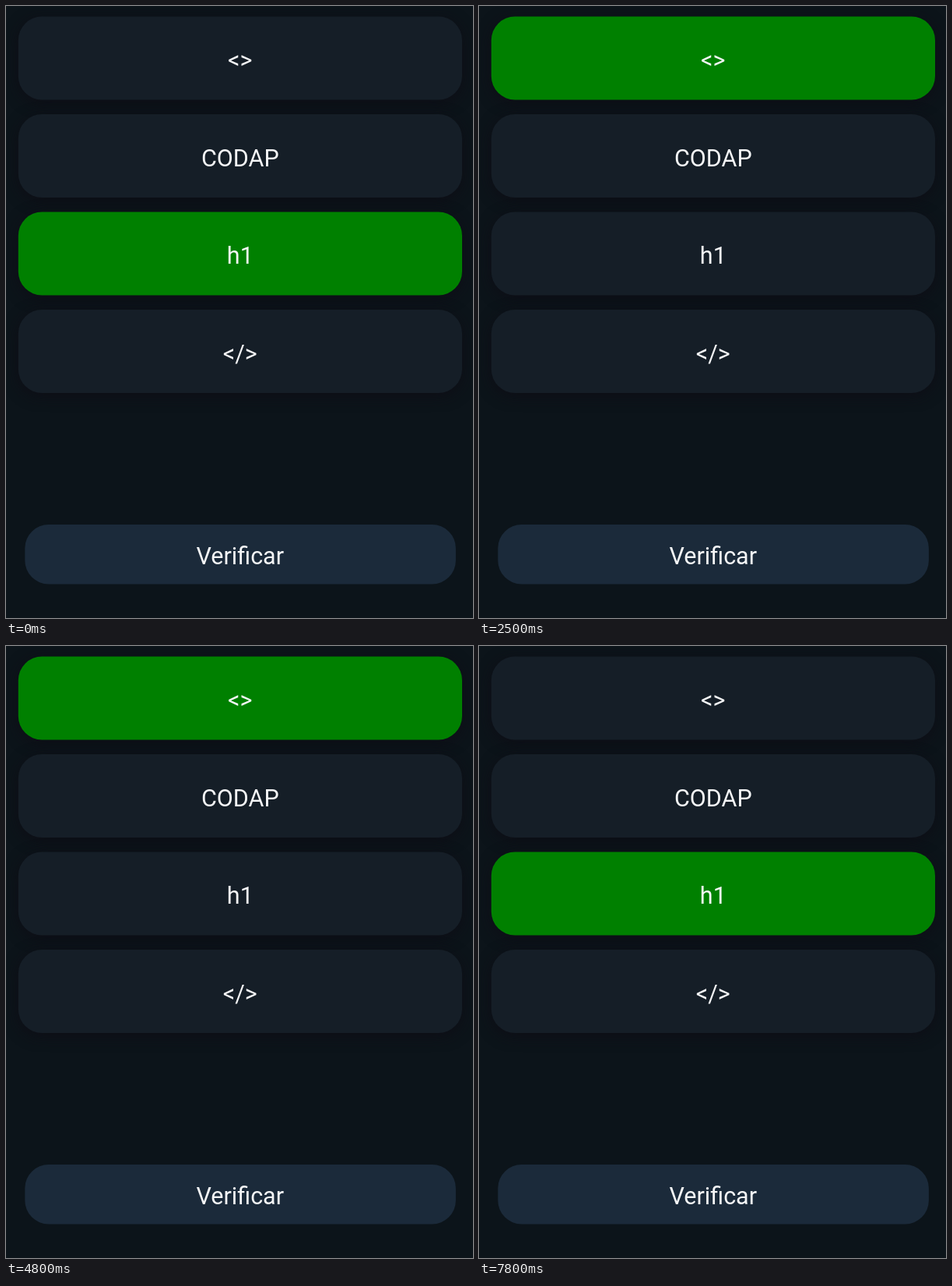
Write an HTML page with a canvas that moves like this. It is 600 by 786 pixels and loops after 8000 ms.

```html
<!DOCTYPE html>
<html lang="pt">
<head>
<meta charset="utf-8">
<title>Quiz</title>
<style>
  html, body { margin: 0; width: 100%; height: 100%; overflow: hidden; background: #0c141a; }
  canvas { display: block; }
</style>
</head>
<body>
<canvas id="stage" width="600" height="786"></canvas>
<script>
const ctx = document.getElementById('stage').getContext('2d');
const LOOP = 8000, STEP = 100, DIM = 0.2;
const FONT = 'Roboto, "Open Sans", sans-serif';
const BG = '#0c141a', CARD = '#151e27', GREEN = '#008000', WHITE = '#f5f6f7';
const OPTIONS = ['<>', 'CODAP', 'h1', '</>'];

const clamp = v => Math.min(1, Math.max(0, v));
const ease = p => p < 0.5 ? 2 * p * p : 1 - 2 * (1 - p) * (1 - p);

// Opacity of a touched button: drops at once, eases back after release.
function touch(t, down, up) {
  if (t < down) return 1;
  return DIM + (1 - DIM) * ease(clamp((t - up) / 250));
}

function text(str, x, y, size, weight, align) {
  ctx.font = `${weight} ${size}px ${FONT}`;
  ctx.textAlign = align;
  ctx.fillStyle = WHITE;
  ctx.fillText(str, x, y);
}

function button(label, x, y, w, h, color, alpha, baseline, shadow) {
  ctx.save();
  ctx.globalAlpha = alpha;
  ctx.save();
  if (shadow) {
    ctx.shadowColor = 'rgba(14, 13, 21, 0.85)';
    ctx.shadowBlur = 18;
    ctx.shadowOffsetY = 4;
  }
  ctx.fillStyle = color;
  ctx.beginPath();
  ctx.roundRect(x, y, w, h, 30.5);
  ctx.fill();
  ctx.restore();
  text(label, 300.8, baseline, 30.5, 400, 'center');
  ctx.restore();
}

function options(t) {
  const chosen = t >= 830 && t < 6950 ? 0 : 2;
  const alphas = [touch(t, 700, 830), 1, touch(t, 5300, 6950), 1];
  OPTIONS.forEach((label, i) => {
    const y = 13.5 + i * 125.5;
    button(label, 15.8, y, 570.2, 107, i === chosen ? GREEN : CARD, alphas[i], y + 66.7, true);
  });
}

function footer(t) {
  button('Verificar', 24.3, 666, 553.6, 76.5, '#1b2a3a', touch(t, 3100, 3250), 716.6, false);
  if (t < 3300 || t >= 4700) return;
  const show = clamp((t - 3200) / 300);
  ctx.globalAlpha = show;
  ctx.fillStyle = '#0b1319';
  ctx.fillRect(0, 555, 600, 231);
  text('Ah não, você errou!', 32.5, 628, 35.4, 700, 'left');
  button('Tentar novamente', 32, 668.7, 537, 76.5, '#ff0000', show * touch(t, 4600, 4700), 719.4, false);
  ctx.globalAlpha = 1;
}

function draw(now) {
  const t = Math.floor((now % LOOP + 2) / STEP) * STEP % LOOP;
  ctx.fillStyle = BG;
  ctx.fillRect(0, 0, 600, 786);
  options(t);
  footer(t);
}

let start = null;
function tick(now) {
  if (start === null) start = now;
  draw(now - start);
  requestAnimationFrame(tick);
}
draw(0);
requestAnimationFrame(tick);
</script>
</body>
</html>
```
